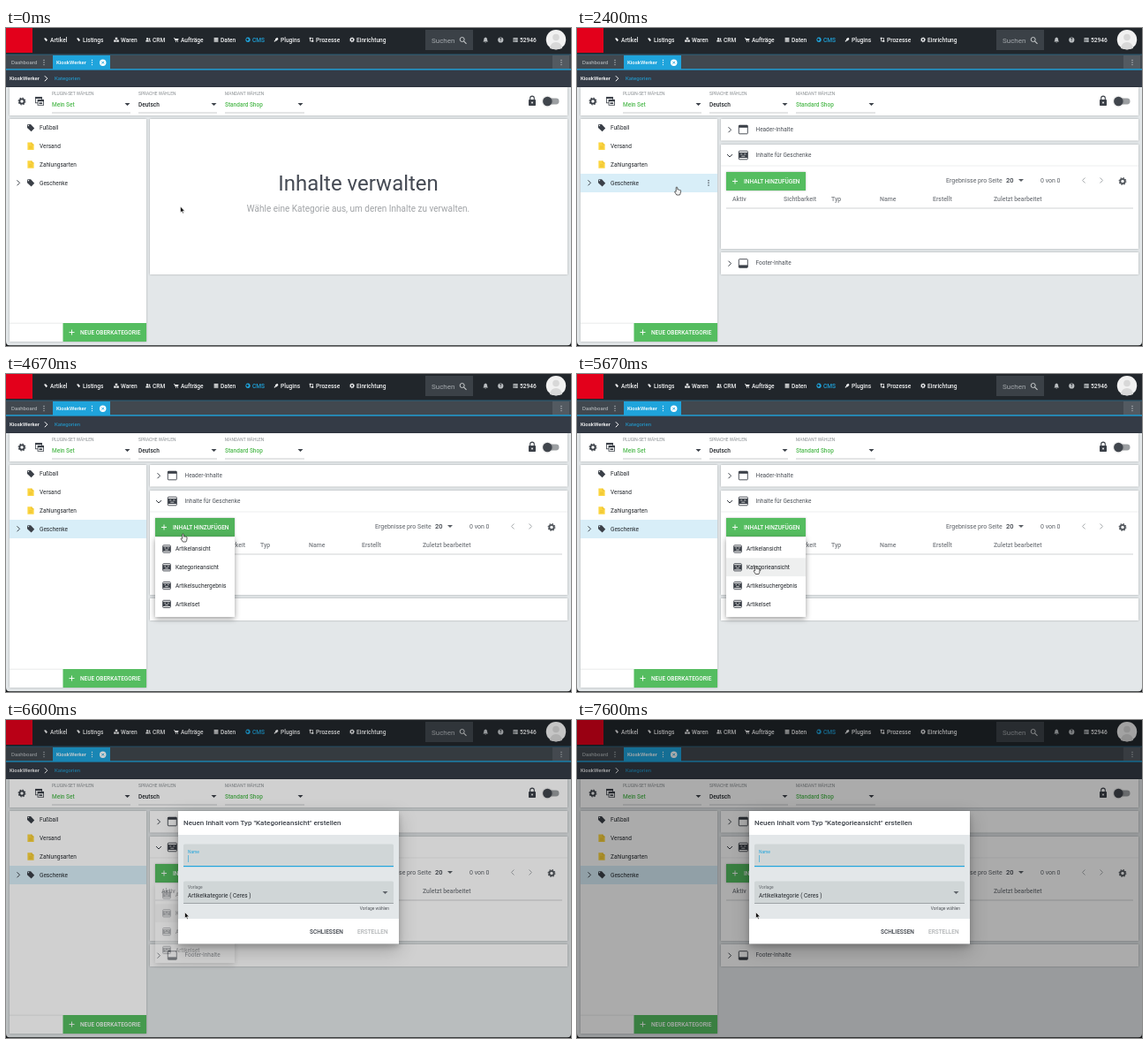
Animation of 640x360 px, one loop 8 s. Source, as an HTML page:

```html
<!DOCTYPE html>
<html lang="de">
<head>
<meta charset="utf-8">
<style>
html, body { margin: 0; width: 100%; height: 100%; overflow: hidden; background: #e3e7e9; }
svg { display: block; font-family: Roboto, sans-serif; }
.card { filter: drop-shadow(0 .7px .8px rgba(0,0,0,.28)); }
.float { filter: drop-shadow(0 2px 3px rgba(0,0,0,.4)); }
.dialog { filter: drop-shadow(0 3px 3px rgba(0,0,0,.2)) drop-shadow(0 7px 10px rgba(0,0,0,.22)); }
</style>
</head>
<body>
<svg id="stage" width="640" height="360" viewBox="0 0 640 360"></svg>
<script>
const DARK = '#3b4048', GREEN = '#55bd60', BLUE = '#1fa4dc', LIGHT = '#e3e7e9', WHITE = '#fff';

// Drawing helpers, each returning SVG markup
const rect = (x, y, w, h, fill, more = '') =>
  `<rect x="${x}" y="${y}" width="${w}" height="${h}" fill="${fill}" ${more}/>`;
const text = (x, y, s, size = 6.5, fill = DARK, weight = 400, anchor = 'start') =>
  `<text x="${x}" y="${y}" font-size="${size}" fill="${fill}" font-weight="${weight}" text-anchor="${anchor}">${s}</text>`;
const shape = (x, y, d, fill, more = '') =>
  `<path transform="translate(${x} ${y})" d="${d}" fill="${fill}" ${more}/>`;
const line = (x, y, d, color = DARK, width = 1) =>
  shape(x, y, d, 'none', `stroke="${color}" stroke-width="${width}"`);
const disc = (x, y, r, fill, more = '') => `<circle cx="${x}" cy="${y}" r="${r}" fill="${fill}" ${more}/>`;
const group = (id, body) => `<g id="${id}">${body}</g>`;

const chevron = (x, y, color, width = 1) => line(x, y, 'M-1.5-3 1.5 0-1.5 3', color, width);
const caretDown = (x, y, color = DARK) => shape(x, y, 'M-3-1.4H3L0 1.6Z', color);
const dots = (x, y, color, r = .75) => [-2.6, 0, 2.6].map(d => disc(x, y + d, r, color)).join('');
const plus = (x, y) => line(x, y, 'M-3 0H3M0-3V3', WHITE, .9);
const gear = (x, y, r, color) =>
  disc(x, y, r * .58, 'none', `stroke="${color}" stroke-width="${r * .4}"`) +
  disc(x, y, r * .85, 'none', `stroke="${color}" stroke-width="${r * .22}" stroke-dasharray="${r * .334}"`);
const tag = (x, y) =>
  shape(x, y, 'M-4-3.2-3.2-4H0L4.2.6.6 4.2-4 0ZM-2.6-3.2a.7.7 0 1 0 .1 0Z', DARK, 'fill-rule="evenodd"');
const note = (x, y) => shape(x, y, 'M-3.6-4.3H1L3.6-1.7V4.3H-3.6Z', '#fcd53f') +
  line(x, y, 'M-1.9.4H1.9M-1.9 2.2H1.9M1-4.3V-1.7H3.6', '#dfb52c', .6);
const frameIcon = (x, y, k = 1) =>
  rect(x - 5 * k, y - 4.8 * k, 10 * k, 9.6 * k, 'none', `rx=".8" stroke="${DARK}" stroke-width=".9"`);
const contentIcon = (x, y, k = 1) => frameIcon(x, y, k) +
  rect(x - 5 * k, y - 3 * k, 10 * k, 6 * k, DARK) +
  line(x, y, `M${-3 * k}${-1.2 * k}H${-k}M${k} ${-1.2 * k}H${3 * k}M${-2 * k} ${1.2 * k}H${2 * k}`, '#ddd', .9);

function header() {
  const nav = [['Artikel', 50], ['Listings', 87], ['Waren', 130], ['CRM', 166], ['Aufträge', 198],
    ['Daten', 243], ['CMS', 279], ['Plugins', 311], ['Prozesse', 351], ['Einrichtung', 397]];
  const glyphs = [
    'M-2-1.5 0-2 2 .5.5 2Z', 'M-2-1.5 0-2 2 .5.5 2Z',
    'M-1.2-2.5H1.2V-.3H-1.2ZM-2.8.2H-.3V2.5H-2.8ZM.3.2H2.8V2.5H.3Z',
    'M-1-2.4a1.1 1.1 0 1 0 .1 0ZM-2.8 2.2q0-2.2 1.8-2.2T1 2.2ZM1.4-1.8a.9.9 0 1 0 .1 0ZM1.5 2.2q0-1.5-.6-1.9 1.9-.4 2.1 1.9Z',
    'M-3-2H-2L-1.4-1.2H2.6L1.8 1H-1.4L-2.4-1.4H-3ZM-1 1.5h1v1h-1ZM1 1.5h1v1H1Z',
    'M-2.4-2.4H2.4V-1H-2.4ZM-2.4-.6H2.4V.8H-2.4ZM-2.4 1.2H2.4V2.5H-2.4Z',
    'M0-2.7a2.7 2.7 0 1 0 .1 0ZM-1.5-1.2 0-1.6 1 0-.5 1.5-1.6.3Z',
    'M-2.5 1.8-.8 0-1.2-.8 1.2-2.5 2.5-1 .8 1.2 0 1-1.8 2.5Z',
    'M-2.3-2.5H-.3V-.8H-2.3ZM.3.8H2.3V2.5H.3ZM-1.7-.8h.7v2.1H.3V2H-1.7ZM.3-2H2V.8H1.3V-1.3H.3Z'];
  const items = nav.map(([s, x], i) => {
    const color = s === 'CMS' ? BLUE : '#f2f3f4';
    const icon = i === 9 ? gear(x - 5, 13.3, 3, color) : shape(x - 5, 13.3, glyphs[i], color, 'fill-rule="evenodd"');
    return icon + text(x, 15.9, s, 6.6, color, 500);
  }).join('');
  return rect(0, 0, 640, 30, '#21262b') + rect(0, 0, 30, 28, '#e3001b') + items +
    rect(475, 2, 54, 23, '#3b4147') + text(482, 16.5, 'Suchen', 8, '#a4a9ad') +
    disc(516.7, 13, 2.5, 'none', 'stroke="#c6c9cb"') + line(518.5, 14.8, 'M0 0 3 3', '#c6c9cb', 1.1) +
    shape(543.2, 13.5, 'M-2.6 2V1.4L-1.9.6V-1Q-1.6-2.7 0-3 1.6-2.7 1.9-1V.6L2.6 1.4V2ZM-.8 2.4H.8Q0 3.6-.8 2.4Z', '#b9bdc0') +
    disc(560.3, 13.5, 3.1, '#b9bdc0') + text(560.3, 15.4, '?', 5, '#21262b', 700, 'middle') +
    rect(574.5, 11, 5.2, 5, '#b9bdc0') + line(574.5, 11, 'M0 1.7H5.2M0 3.3H5.2M1.7 1.5V5', '#21262b', .4) +
    text(582, 15.9, '52946', 6.6, '#f2f3f4', 500) +
    disc(623, 13.2, 11.2, '#f1f1f1') + disc(623, 10.5, 3.8, '#d8d8d8') +
    shape(623, 23, 'M-7 0Q-6-7 0-7T7 0Q0 2.6-7 0Z', '#d8d8d8') +
    // Tabs and breadcrumb
    rect(0, 30, 640, 17, '#41484f') + rect(0, 29.6, 640, .9, '#2b6482') +
    text(6, 41, 'Dashboard', 6, '#c3c7ca') + dots(43, 39, '#c3c7ca', .65) +
    rect(53, 31, 65, 16, BLUE) + text(57, 41, 'KioskWerker', 6, WHITE, 500) + dots(97.5, 39, WHITE, .65) +
    disc(109.7, 39.2, 3.7, WHITE) + line(109.7, 39.2, 'M-1.4-1.4 1.4 1.4M1.4-1.4-1.4 1.4', BLUE, .9) +
    rect(619, 31, 19, 15, '#535a61') + dots(629, 39, '#c3c7ca', .65) +
    rect(0, 47, 640, 20, '#343b46') + rect(0, 46.2, 640, 1.4, BLUE) +
    text(4, 59.3, 'KioskWerker', 6, WHITE, 500) +
    chevron(45.3, 57.2, WHITE) + text(55, 59.3, 'Kategorien', 6, BLUE);
}

function toolbar() {
  const select = (x, end, arrow, label, value, color) =>
    text(x, 76, label, 4.875, '#858a8e') + text(x, 89.3, value, 6.5, color, 500) + caretDown(arrow, 86.5) +
    line(x, 96, `M0 0H${end - x}`, '#a5a9ac', .6);
  return rect(4, 67, 632, 32, WHITE, 'class="card"') + gear(18, 83, 4.6, DARK) +
    rect(33.5, 78.3, 7, 6.5, WHITE, `stroke="${DARK}" stroke-width=".8"`) + rect(33, 78, 8, 2, DARK) +
    rect(36, 81.3, 6.6, 6, WHITE, `stroke="${DARK}" stroke-width=".8"`) + rect(36, 81, 7, 2.2, DARK) + rect(37.5, 84.4, 3.6, 1.6, DARK) +
    select(52, 141, 137.5, 'PLUGIN-SET WÄHLEN', 'Mein Set', '#4fba4f') +
    select(150, 239, 235.5, 'SPRACHE WÄHLEN', 'Deutsch', '#22262b') +
    select(248, 338, 333.5, 'MANDANT WÄHLEN', 'Standard Shop', '#4fba4f') +
    rect(592, 81, 8, 7, DARK, 'rx=".8"') + line(596, 81, 'M-2.3.5V-1.6a2.3 2.3 0 0 1 4.6 0V.5', DARK, 1.1) +
    disc(596, 84.5, .9, WHITE) +
    rect(610, 79.6, 16.5, 6.8, '#9c9fa2', 'rx="3.4"') + disc(613.3, 83, 5.2, '#41464d', 'class="card"');
}

function sidebar() {
  const rows = [['Fußball', tag], ['Versand', note], ['Zahlungsarten', note], ['Geschenke', tag]].map(([s, icon], i) => {
    const y = 113 + 20.75 * i;
    return icon(28, y) + text(38, y + 2.3, s, 6.5, '#22262b');
  }).join('');
  return rect(4, 103, 155, 252, WHITE, 'class="card"') +
    rect(4, 165, 155, 21, '#edeff0', 'id="rowHover"') + rect(4, 165, 155, 21, '#d8eef8', 'id="rowActive"') +
    rows + chevron(14, 175.3, DARK) + group('rowDots', dots(149, 175.3, DARK)) +
    line(4, 334.2, 'M0 0H60', '#dcdfe0', .6) +
    rect(64.5, 334, 94.5, 21, GREEN) + plus(74.5, 344.5) + text(84, 347, 'NEUE OBERKATEGORIE', 6.5, WHITE, 500);
}

const welcome = () => rect(163, 103, 473, 176, WHITE, 'class="card"') +
  text(399, 184, 'Inhalte verwalten', 24, '#454a54', 400, 'middle') +
  text(399, 207.5, 'Wähle eine Kategorie aus, um deren Inhalte zu verwalten.', 10, '#a0a3a6', 400, 'middle');

function contents() {
  const columns = [['Aktiv', 176], ['Sichtbarkeit', 234], ['Typ', 288], ['Name', 343], ['Erstellt', 403], ['Zuletzt bearbeitet', 472]];
  const panel = (y, h, label) => rect(163, y, 473, h, WHITE, 'class="card"') + text(202.5, y + 14.3, label, 6.5, '#4c5158');
  return panel(103, 24.5, 'Header-Inhalte') + chevron(173, 115.2, DARK) + frameIcon(188.3, 115) + rect(183.3, 110, 10, 2.8, DARK) +
    panel(132, 118, 'Inhalte für Geschenke') + line(173, 144.5, 'M-3-1.5 0 1.5 3-1.5') + contentIcon(188.3, 144) +
    line(163, 156, 'M0 0H473', '#e3e5e6', .6) +
    panel(254, 25, 'Footer-Inhalte') + chevron(173, 266.7, DARK) + frameIcon(188.3, 266.5) + rect(183.3, 268.4, 10, 2.8, DARK) +
    rect(169, 163, 90, 21, GREEN, 'class="card"') + rect(169, 163, 90, 21, '#000', 'id="buttonHover"') +
    plus(179, 173.5) + text(189, 175.8, 'INHALT HINZUFÜGEN', 6.5, WHITE, 500) +
    text(418, 175, 'Ergebnisse pro Seite', 7, '#5a5f65') + text(486, 175, '20', 7.5, DARK, 500) + caretDown(503, 172.3, '#5a5f65') +
    text(525, 175, '0 von 0', 7, '#5a5f65') +
    line(574, 172.5, 'M1.5-3-1.5 0 1.5 3', '#a9adb0') + chevron(594, 172.5, '#a9adb0') + gear(618, 173.5, 4.6, '#50555b') +
    columns.map(([s, x]) => text(x, 196, s, 6.9, '#7a7e83', 500)).join('') +
    line(169, 204, 'M0 0H461', '#c4c7c9', .8);
}

function menu() {
  const items = ['Artikelansicht', 'Kategorieansicht', 'Artikelsuchergebnis', 'Artikelset'];
  return rect(169, 184.5, 90, 90.5, WHITE, 'class="float"') + rect(169, 187.5, 90, 20.8, '#eeefef', 'id="itemHover"') +
    items.map((s, i) => contentIcon(182, 198 + 20.8 * i, .86) + text(192, 200.2 + 20.8 * i, s, 6.5, '#22262b')).join('');
}

function dialog() {
  return rect(195, 103, 250, 150.5, WHITE, 'class="dialog"') +
    text(201, 119.3, 'Neuen Inhalt vom Typ "Kategorieansicht" erstellen', 8, DARK, 500) +
    rect(195, 130, 250, 95, LIGHT) +
    rect(201, 140.5, 238, 25.5, '#d0d6d7', 'rx="1.5"') + rect(201, 165, 238, 1.2, BLUE) +
    text(206, 150.5, 'Name', 4.875, BLUE) + rect(206, 153, .6, 8, BLUE, 'id="caret"') +
    rect(201, 182.5, 238, 25, '#d0d6d7', 'rx="1.5"') + rect(201, 207, 238, .7, '#858a8e') +
    text(206, 191.3, 'Vorlage', 4.875, '#60656a') + text(206, 201, 'Artikelkategorie ( Ceres )', 6.5, '#22262b') +
    caretDown(429.5, 195.3, '#5f646a') + text(434, 215.2, 'Vorlage wählen', 4.875, '#50555a', 400, 'end') +
    text(344, 241.8, 'SCHLIESSEN', 6.5, DARK, 500) + text(398, 241.8, 'ERSTELLEN', 6.5, '#b0b3b5', 500);
}

const cursors =
  group('arrow', shape(0, 0, 'M0 0V7L1.6 5.6 2.7 8 3.8 7.5 2.8 5.2H5Z', '#111', 'stroke="#fff" stroke-width=".6"')) +
  group('hand', shape(0, 0, 'M-.8.4Q0-.4.7.4L1 3Q1.8 2.5 2.3 3.2 3.1 2.7 3.5 3.5 4.5 3.2 4.6 4.4L4.2 7.2 3.4 9H-.2L-2.4 5.6Q-2.4 4.4-.8 5.2Z',
    '#f4f4f4', 'stroke="#222" stroke-width=".7"'));

// Dark rim with rounded lower window corners
const windowEdge = shape(0, 360, 'M0 0V-5Q0-.8 4-.8H636Q640-.8 640-5V0Z', '#15181a');

const stage = document.getElementById('stage');
stage.innerHTML = rect(0, 0, 640, 360, LIGHT) + header() + toolbar() + sidebar() +
  group('welcome', welcome()) + group('contents', contents()) + group('menu', menu()) +
  windowEdge + rect(0, 0, 640, 360, '#000', 'id="backdrop"') +
  group('dialog', dialog()) + group('pointer', cursors);

const parts = Object.fromEntries([...stage.querySelectorAll('[id]')].map(el => [el.id, el]));
const fade = (id, value) => parts[id].setAttribute('opacity', +value);
const move = (id, transform) => parts[id].setAttribute('transform', transform);
const ramp = (t, from, to) => Math.min(1, Math.max(0, (t - from) / (to - from)));
const smooth = u => u * u * (3 - 2 * u);
const scaleAt = (x, y, sx, sy = sx) => `translate(${x} ${y}) scale(${sx} ${sy}) translate(${-x} ${-y})`;

// Pointer trips: start and end time, then start, control and end point of a curve
const trips = [
  [480, 1600, 197.5, 202, 155, 215, 113, 180],
  [3010, 4020, 113, 180, 157, 220, 200.5, 180],
  [4560, 5660, 200.5, 180, 201, 198, 202.5, 217.5]];

function pointerAt(t) {
  const [from, to, x0, y0, x1, y1, x2, y2] = trips.findLast(trip => t >= trip[0]) || trips[0];
  const u = smooth(ramp(t, from, to)), v = 1 - u;
  const bend = (a, b, c) => v * v * a + 2 * u * v * b + u * u * c;
  return [bend(x0, x1, x2), bend(y0, y1, y2)];
}

function draw(t) {
  const [x, y] = pointerAt(t);
  const overRow = x < 159 && y > 165 && y < 187.5;
  const overButton = t > 3900 && t < 6480;
  move('pointer', `translate(${x} ${y})`);
  fade('hand', overRow || overButton);
  fade('arrow', !(overRow || overButton));

  fade('rowHover', ramp(t, 1370, 1550));
  fade('rowActive', ramp(t, 2130, 2330));
  fade('rowDots', overRow);
  fade('welcome', t < 2270);
  fade('contents', t >= 2270);
  fade('buttonHover', t < 4900 ? .05 * ramp(t, 3930, 4200) : 0);

  const open = ramp(t, 4470, 4610);
  fade('menu', open * (1 - ramp(t, 6540, 6640)));
  move('menu', scaleAt(169, 184.5, 1, .8 + .2 * open));
  fade('itemHover', y > 188);
  move('itemHover', `translate(0 ${y > 208.3 ? 20.8 : 0})`);

  const enter = ramp(t, 6465, 6590);
  fade('backdrop', .33 * (1 - (1 - ramp(t, 6465, 6865)) ** 2));
  fade('dialog', enter ** 1.3);
  move('dialog', scaleAt(320, 178, .7 + .3 * enter));
  fade('caret', t < 7100 || t >= 7600);
}

const begin = performance.now();
function tick() {
  draw((performance.now() - begin) % 8000);
  requestAnimationFrame(tick);
}
tick();
</script>
</body>
</html>
```
